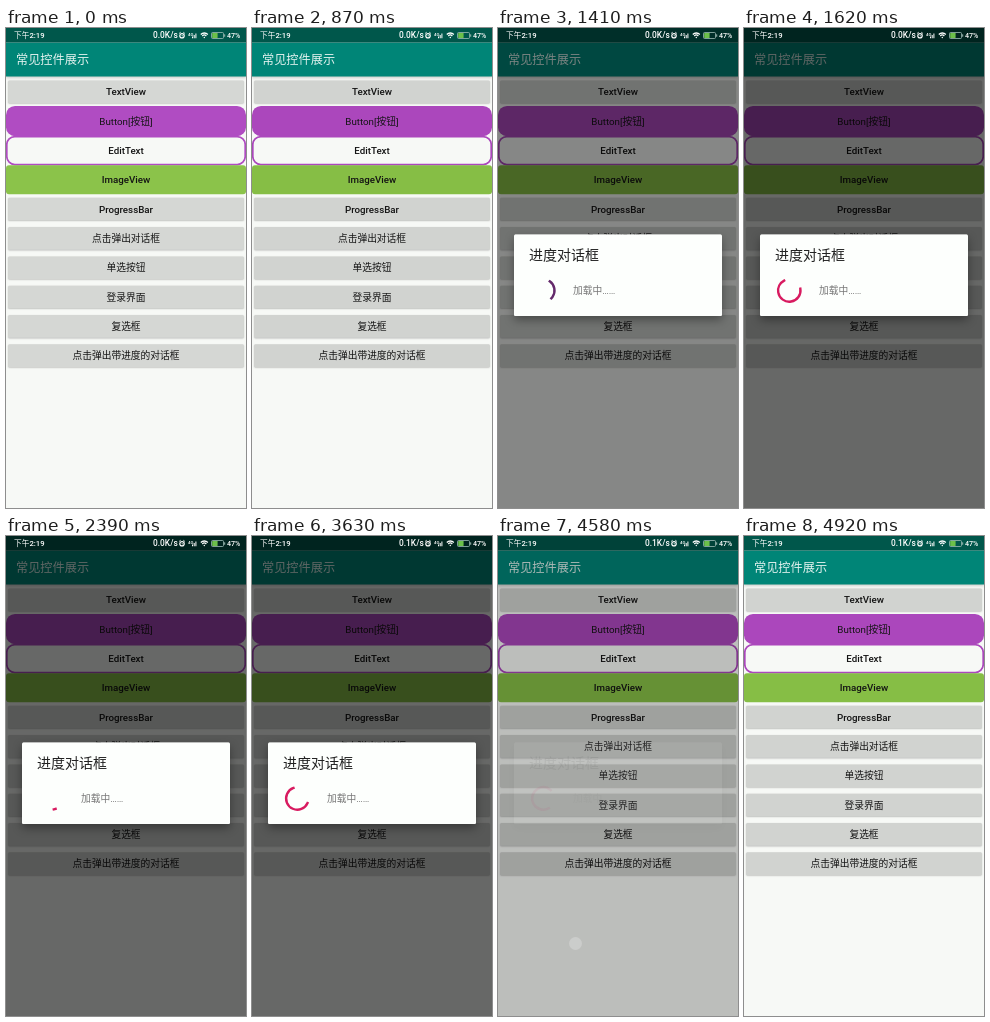
These frames come from a looping animation (240 px wide and 480 px high, 5.18 s). An HTML page with a canvas:

```html
<!DOCTYPE html>
<html lang="zh-CN">
<head>
<meta charset="utf-8">
<style>
html, body { margin: 0; width: 100%; height: 100%; overflow: hidden; background: #f7f9f6; }
canvas { display: block; width: 240px; height: 480px; }
</style>
</head>
<body>
<canvas id="stage"></canvas>
<script>
const LOOP = 5180, W = 240, H = 480, STEP = 70;
const FONT = 'Roboto, "Noto Sans CJK SC", "Noto Sans CJK", sans-serif';
const canvas = document.getElementById('stage');
const dpr = window.devicePixelRatio || 1;
canvas.width = W * dpr;
canvas.height = H * dpr;
const g = canvas.getContext('2d');

// Spans in which the screen refreshes every STEP ms; it holds in between
const REFRESH = [
  [0, 70], [400, 670], [870, 1280], [1410, 3020],
  [3150, 3630], [3700, 4180], [4310, 4720], [4850, 4920]
];
// Uneven capture: clock time in ms -> spinner age in seconds
const SPIN = [[1140, 0], [1210, .075], [1410, .2], [2390, 1.41], [3630, 3.476], [4580, 4.45], [4720, 4.6]];
const DIM = [[1190, 0], [1210, .02], [1410, .46], [1480, .58], [4430, .58], [4580, .24], [4690, 0]];
const DIALOG = [[1140, 0], [1210, .55], [1280, 1], [4380, 1], [4580, .07], [4620, 0]];
const PRESS = [[870, 0], [1080, .085], [1210, .08], [1400, 0]];

function lerpKeys(keys, t) {
  if (t <= keys[0][0]) return keys[0][1];
  for (let i = 1; i < keys.length; i++) {
    const [t0, a] = keys[i - 1], [t1, b] = keys[i];
    if (t <= t1) return a + (b - a) * (t - t0) / (t1 - t0);
  }
  return keys[keys.length - 1][1];
}

function snap(t) {
  let last = 0;
  for (const [from, to] of REFRESH) {
    if (t < from) break;
    const left = Math.max(0, Math.ceil((to - t) / STEP));
    last = Math.max(from, to - left * STEP);
  }
  return last;
}

// y at x for a cubic Bezier running from (x0,0) to (x3,1)
function bezier(x, x0, x1, x2, x3) {
  if (x <= x0) return 0;
  if (x >= x3) return 1;
  let lo = 0, hi = 1;
  for (let i = 0; i < 24; i++) {
    const m = (lo + hi) / 2, n = 1 - m;
    const v = n * n * n * x0 + 3 * n * n * m * x1 + 3 * n * m * m * x2 + m * m * m * x3;
    if (v < x) lo = m; else hi = m;
  }
  return lo * lo * (3 - 2 * lo);
}

function rect(x, y, w, h, r, fill) {
  g.beginPath();
  g.roundRect(x, y, w, h, r);
  g.fillStyle = fill;
  g.fill();
}

function outline(x, y, w, h, r, color, width) {
  g.beginPath();
  g.roundRect(x, y, w, h, r);
  g.strokeStyle = color;
  g.lineWidth = width;
  g.stroke();
}

function text(str, x, y, size, color, align = 'left', weight = 400) {
  g.font = `${weight} ${size}px ${FONT}`;
  g.textAlign = align;
  g.fillStyle = color;
  g.fillText(str, x, y);
}

function line(points, color, width) {
  g.beginPath();
  points.forEach(([x, y]) => g.lineTo(x, y));
  g.strokeStyle = color;
  g.lineWidth = width;
  g.stroke();
}

function arc(x, y, r, from, to, color, width) {
  g.beginPath();
  g.arc(x, y, r, from, to);
  g.strokeStyle = color;
  g.lineWidth = width;
  g.stroke();
}

function shadow(color, blur, dy) {
  g.shadowColor = color;
  g.shadowBlur = blur * dpr;
  g.shadowOffsetY = dy * dpr;
}

function statusIcons(t) {
  const ink = '#fff';
  text('下午2:19', 8, 10.4, 7.7, ink, 'left', 500);
  text(t < 3390 ? '0.0K/s' : '0.1K/s', 147, 10.4, 8.4, ink, 'left', 500);
  // alarm
  arc(176, 7.7, 2.2, 0, 7, ink, 1.2);
  line([[173.2, 5.4], [174.6, 4.3]], ink, 1);
  line([[177.4, 4.3], [178.8, 5.4]], ink, 1);
  line([[176, 6.4], [176, 7.9], [177, 7.9]], ink, .6);
  // mobile signal
  text('4G', 182, 8.4, 4.4, ink, 'left', 500);
  for (let i = 0; i < 3; i++) rect(186 + i * 1.7, 8.6 - i * 1.6, 1, 1.6 + i * 1.6, 0, ink);
  // wifi
  arc(198.3, 10, 5, -2.35, -.79, ink, 1.3);
  arc(198.3, 10, 2.9, -2.35, -.79, ink, 1.3);
  rect(197.6, 8.8, 1.4, 1.4, .7, ink);
  // battery
  outline(205.5, 4.5, 12, 6, 1, '#9dbcb5', .8);
  rect(206.2, 5.1, 5.4, 4.8, .3, '#6cc04a');
  rect(218.2, 6.2, 1, 2.6, .3, '#9dbcb5');
  text('47%', 221, 10.2, 7.1, ink, 'left', 500);
}

function toolbar() {
  shadow('rgba(0,0,0,.22)', 3, 1);
  rect(0, 14.5, W, 34, 0, '#008577');
  shadow('transparent', 0, 0);
  rect(0, 0, W, 14.5, 0, '#00574b');
  text('常见控件展示', 10, 36.3, 12.2, '#e4f3f0');
}

function buttons(t) {
  const early = t < 870;
  const purple = early ? '#b04cc2' : '#ab47bc';
  const green = early ? '#8bc34a' : '#86be45';
  const gray = early ? '#d5d7d4' : '#d1d3d0';
  const labels = ['TextView', 'Button[按钮]', 'EditText', 'ImageView', 'ProgressBar',
    '点击弹出对话框', '单选按钮', '登录界面', '复选框', '点击弹出带进度的对话框'];
  labels.forEach((label, i) => {
    const y = 63.8 + i * 29.33;
    if (i === 1) {
      rect(0, y - 15.2, W, 30.2, 9, purple);
    } else if (i === 2) {
      outline(.8, y - 13.9, W - 1.6, 28, 8, purple, 1.7);
    } else if (i === 3) {
      rect(0, y - 14.5, W, 29, 3, green);
    } else {
      shadow('rgba(0,0,0,.24)', 1.6, .6);
      rect(2.2, y - 11.4, W - 4.4, 22.8, 1.2, gray);
      shadow('transparent', 0, 0);
      if (i === 9) rect(2.2, y - 11.4, W - 4.4, 22.8, 1.2, `rgba(0,0,0,${lerpKeys(PRESS, t)})`);
    }
    const latin = i < 5 && i !== 1;
    text(label, W / 2, y + 3.6, 9.75, '#141414', 'center', latin ? 500 : 400);
  });
}

function spinner(t) {
  const age = lerpKeys(SPIN, t), cycle = 1.333;
  const x = age % cycle / cycle;
  const base = age * .3 + x * .25;
  const start = base + .75 * bezier(x, .5, .7, .6, 1);
  const end = base + .75 * bezier(x, 0, .2, .1, .5);
  const angle = v => v * Math.PI * 2 - Math.PI / 2;
  g.lineCap = 'square';
  arc(45.3, 262.5, 11.2, angle(start), angle(Math.max(end, start + .002)),
    t < 1470 ? '#642a6b' : '#d81b60', 2.4);
  g.lineCap = 'butt';
}

function dialog(t) {
  const alpha = lerpKeys(DIALOG, t);
  if (alpha <= 0) return;
  const box = [16, 206.5, 208, 81.5, 1.5];
  g.globalAlpha = alpha;
  // the shadow falls only outside the translucent panel
  g.save();
  g.beginPath();
  g.rect(0, 0, W, H);
  g.roundRect(...box);
  g.clip('evenodd');
  shadow('rgba(0,0,0,.36)', 10, 4);
  rect(...box, '#fdfffd');
  g.restore();
  rect(...box, '#fdfffd');
  text('进度对话框', 31, 232.3, 14, '#212121');
  text('加载中……', 75, 266.3, 9.75, '#757575');
  spinner(t);
  g.globalAlpha = 1;
}

function draw(now) {
  const t = snap(now % LOOP);
  g.setTransform(dpr, 0, 0, dpr, 0, 0);
  rect(0, 0, W, H, 0, '#f7f9f6');
  toolbar();
  buttons(t);
  rect(0, 0, W, H, 0, `rgba(0,0,0,${lerpKeys(DIM, t)})`);
  statusIcons(t);
  dialog(t);
  // touch point that dismisses the dialog
  if (t >= 4310 && t < 4630) rect(71, 401, 13, 13, 6.5, 'rgba(235,237,235,.32)');
}

const begin = performance.now();
function tick() {
  draw(performance.now() - begin);
  requestAnimationFrame(tick);
}
tick();
</script>
</body>
</html>
```
